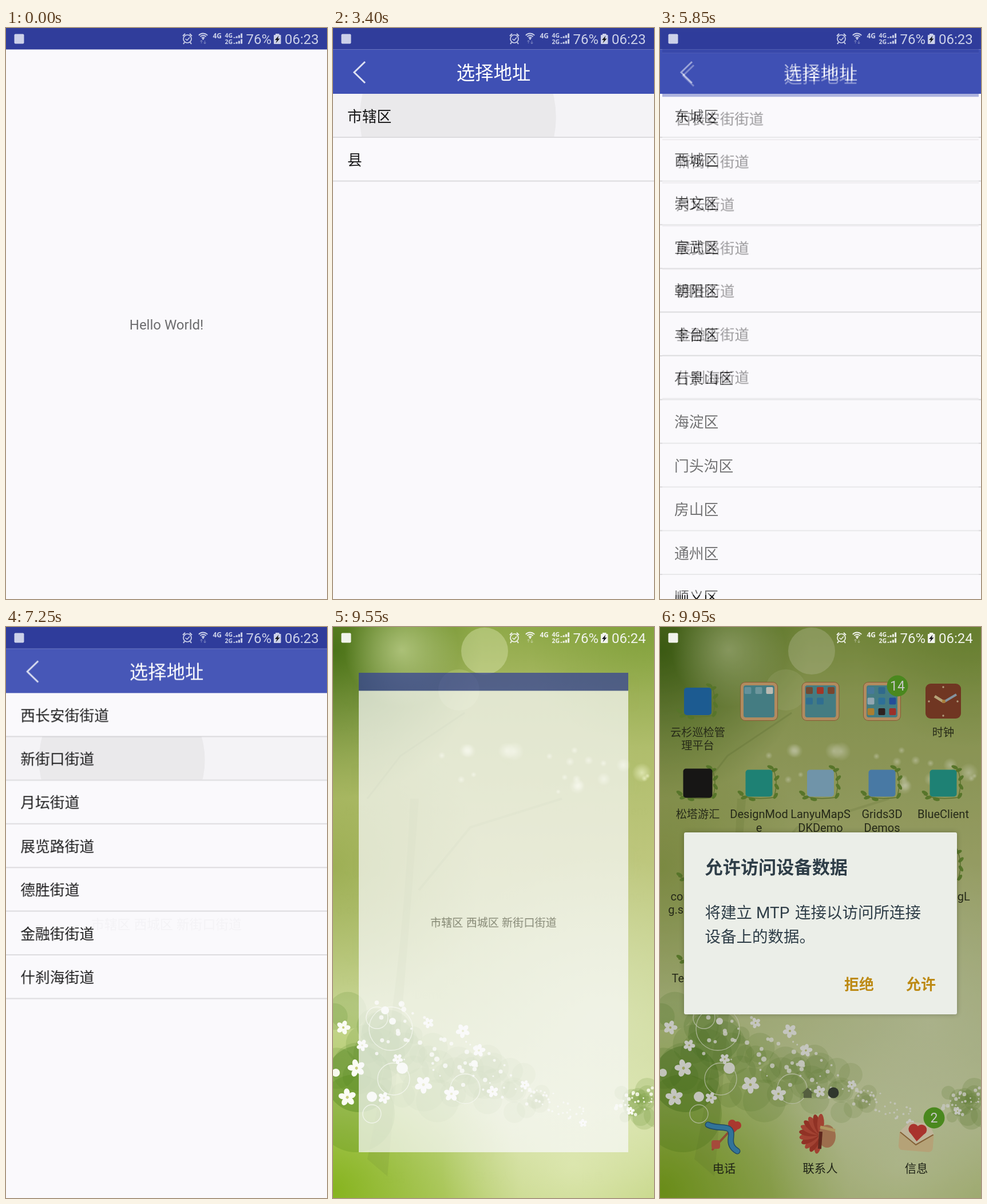
Animation of 561x998 px, one loop 10 s. Source, as an HTML page with a canvas:

```html
<!DOCTYPE html>
<html lang="zh">
<head>
<meta charset="utf-8">
<title>Address picker</title>
<style>
html, body { margin: 0; width: 100%; height: 100%; overflow: hidden; background: #faf9fc; }
canvas { display: block; width: 561px; height: 998px; }
</style>
</head>
<body>
<canvas id="stage"></canvas>
<script>
const W = 561, H = 998, LOOP = 10000, TAU = Math.PI * 2;
const DPR = window.devicePixelRatio || 1;
const LATIN = 'Roboto, "Noto Sans CJK SC", sans-serif';
const CJK = '"Noto Sans CJK SC", "Noto Sans CJK", sans-serif';
const PAPER = '#faf9fc', ROW_TOP = 115, ROW_H = 76.4;

const clamp = v => Math.max(0, Math.min(1, v));
const span = (t, from, length) => clamp((t - from) / length);
const smooth = p => p * p * (3 - 2 * p);

function setup(canvas) {
  canvas.width = W * DPR;
  canvas.height = H * DPR;
  const g = canvas.getContext('2d');
  g.scale(DPR, DPR);
  return g;
}

function layer(draw) {
  const canvas = document.createElement('canvas');
  draw(setup(canvas));
  return canvas;
}

function box(g, x, y, w, h, color, r = 0) {
  g.fillStyle = color;
  g.beginPath();
  g.roundRect(x, y, w, h, r);
  g.fill();
}

function disc(g, x, y, r, color) {
  g.fillStyle = color;
  g.beginPath();
  g.arc(x, y, r, 0, TAU);
  g.fill();
}

function line(g, points, color, width) {
  g.strokeStyle = color;
  g.lineWidth = width;
  g.beginPath();
  points.forEach(([x, y]) => g.lineTo(x, y));
  g.stroke();
}

function text(g, str, x, y, size, color, { align = 'left', family = CJK, weight = 400 } = {}) {
  g.font = `${weight} ${size}px ${family}`;
  g.textAlign = align;
  g.fillStyle = color;
  g.fillText(str, x, y);
}

function random(seed) {
  return () => (seed = (seed * 16807) % 2147483647) / 2147483647;
}

// ---- app pages ----
function blank(g) {
  box(g, 0, 0, W, H, PAPER);
  box(g, 0, 0, W, 37.5, '#303d9b');
}

const hello = layer(g => {
  blank(g);
  text(g, 'Hello World!', 280.5, 527, 24, '#6c6c6e', { align: 'center', family: LATIN });
});

const result = layer(g => {
  blank(g);
  ['市辖区', '西城区', '新街口街道'].forEach((s, i) => text(g, s, 149 + i * 74.4, 527.5, 22.8, '#6c6c6e'));
});

function listPage(items) {
  return layer(g => {
    blank(g);
    box(g, 0, 37.5, W, 77.5, '#3f50b4');
    line(g, [[56, 59], [37, 77.5], [56, 96]], '#dde0f2', 3);
    text(g, '选择地址', 280.5, 90, 32.4, '#fff', { align: 'center' });
    items.split(' ').forEach((s, i) => {
      text(g, s, 25, 163.5 + i * ROW_H, 25.8, '#151516');
      box(g, 0, ROW_TOP + (i + 1) * ROW_H - 1.4, W, 2, '#dcdbde');
    });
  });
}

const cities = listPage('市辖区 县');
const districts = listPage('东城区 西城区 崇文区 宣武区 朝阳区 丰台区 石景山区 海淀区 门头沟区 房山区 通州区 顺义区');
const streets = listPage('西长安街街道 新街口街道 月坛街道 展览路街道 德胜街道 金融街街道 什刹海街道');

// ---- launcher ----
function flower(g, x, y, r, turn) {
  for (let i = 0; i < 5; i++) {
    const a = turn + i * TAU / 5;
    g.fillStyle = '#fbfcf4';
    g.beginPath();
    g.ellipse(x + Math.cos(a) * r * .58, y + Math.sin(a) * r * .58, r * .46, r * .34, a, 0, TAU);
    g.fill();
  }
  disc(g, x, y, r * .16, '#c9cf7a');
}

function glow(g, x, y, r, color) {
  const fade = g.createRadialGradient(x, y, 0, x, y, r);
  fade.addColorStop(0, `rgba(${color})`);
  fade.addColorStop(1, `rgba(${color.replace(/[^,]+$/, '0')})`);
  g.fillStyle = fade;
  g.fillRect(x - r, y - r, 2 * r, 2 * r);
}

const wallpaper = layer(g => {
  const rnd = random(77);
  const base = g.createLinearGradient(0, 0, 0, H);
  [[0, '#8fa948'], [.12, '#a9b964'], [.4, '#bdc67c'], [.65, '#c8d593'], [.85, '#d5e0a8'], [1, '#c3d482']]
    .forEach(([at, c]) => base.addColorStop(at, c));
  g.fillStyle = base;
  g.fillRect(0, 0, W, H);
  glow(g, 0, 40, 260, '62,104,14,.85');
  glow(g, 0, 420, 260, '130,155,50,.55');
  glow(g, 0, 985, 330, '128,176,20,.9');
  glow(g, 540, 10, 200, '120,155,50,.55');
  glow(g, 470, 690, 290, '226,233,192,.6');
  glow(g, 420, 940, 230, '226,235,185,.7');
  glow(g, 120, 40, 100, '212,226,165,.6');
  disc(g, 265, 42, 41, 'rgba(225,235,185,.38)');
  disc(g, 220, 110, 36, 'rgba(220,230,170,.2)');

  // faint plant stem and twigs
  g.fillStyle = 'rgba(105,130,50,.16)';
  g.beginPath();
  g.moveTo(150, 300);
  g.quadraticCurveTo(125, 640, 95, 960);
  g.lineTo(60, 930);
  g.quadraticCurveTo(120, 640, 135, 300);
  g.fill();
  line(g, [[60, 300], [118, 225], [230, 150]], 'rgba(100,125,50,.22)', 3);
  line(g, [[150, 460], [240, 350], [400, 300]], 'rgba(100,125,50,.16)', 4);
  for (let i = 0; i < 22; i++) {
    glow(g, 190 + rnd() * 360, 215 + rnd() * 75, 4 + rnd() * 13, '248,252,215,.6');
  }

  // bush
  for (let i = 0; i < 46; i++) {
    const u = rnd();
    disc(g, u * 370, 730 + u * 95 + (rnd() - .5) * 140 * (1 - u * .5), 14 + rnd() * 34 * (1.2 - u),
      `rgba(${78 + u * 50 | 0},${128 + u * 30 | 0},${32 + u * 40 | 0},.17)`);
  }
  disc(g, 40, 850, 68, 'rgba(90,140,25,.28)');
  disc(g, 45, 790, 58, 'rgba(60,115,15,.3)');
  disc(g, 95, 715, 46, 'rgba(90,135,45,.25)');
  for (let i = 0; i < 14; i++) disc(g, 495 + rnd() * 80, 808 + rnd() * 52, 8 + rnd() * 14, 'rgba(120,155,65,.22)');

  [[101, 702, 38], [77, 683, 19], [106, 790, 28], [68, 851, 16], [231, 807, 26]].forEach(([x, y, r]) => {
    g.strokeStyle = 'rgba(245,250,225,.75)';
    g.lineWidth = 1.3;
    g.beginPath();
    g.arc(x, y, r, 0, TAU);
    g.stroke();
  });
  for (let i = 0; i < 95; i++) {
    const u = rnd();
    disc(g, 70 + u * 370, 690 + u * 165 + (rnd() - .5) * 120 * (1 - u * .75), 1.3 + rnd() * 3.8 * (1.2 - u),
      'rgba(250,252,240,.85)');
  }
  for (let i = 0; i < 26; i++) disc(g, 490 + rnd() * 71, 805 + rnd() * 48, 1 + rnd() * 2.5, 'rgba(250,252,240,.85)');
  [[91, 670, 7], [121, 771, 10], [68, 821, 9], [104, 689, 6], [5, 779, 7], [247, 763, 6]]
    .forEach(([x, y, r]) => disc(g, x, y, r, '#f8faee'));
  [[18, 700, 12], [41, 771, 15], [51, 731, 10], [25, 822, 15], [158, 800, 15], [207, 816, 13], [227, 706, 12],
    [255, 740, 11], [167, 692, 9], [89, 823, 10], [279, 812, 10], [335, 800, 8], [437, 867, 7], [113, 755, 9], [520, 846, 7]]
    .forEach(([x, y, r], i) => flower(g, x, y, r, i * .7));
});

function leaf(g, x, y, turn) {
  g.fillStyle = '#6f9636';
  g.beginPath();
  g.ellipse(x, y, 6, 3, turn, 0, TAU);
  g.fill();
}

function vine(g, x, y) {
  g.strokeStyle = '#78903c';
  g.lineWidth = 1.5;
  g.beginPath();
  g.moveTo(x - 34, y + 20);
  g.quadraticCurveTo(x - 12, y + 30, x + 26, y + 25);
  g.quadraticCurveTo(x + 34, y, x + 26, y - 22);
  g.stroke();
  [[-32, 17, .5], [-26, 25, -.3], [-12, 28, .2], [29, 22, -1], [31, 6, 1], [31, -9, -.8], [27, -23, -.4], [20, -28, .4]]
    .forEach(([dx, dy, a]) => leaf(g, x + dx, y + dy, a));
}

function tile(g, x, y, color, size = 48) {
  vine(g, x, y);
  box(g, x - size / 2, y - size / 2, size, size, color, 5);
}

function folder(g, x, cells) {
  box(g, x - 33, 96, 66, 68, '#a87440', 9);
  box(g, x - 32, 97, 64, 66, '#e2b27a', 8);
  box(g, x - 27, 102, 54, 56, '#579fa6', 4);
  cells.forEach((c, i) => {
    if (c) box(g, x - 25.5 + i % 3 * 19, 105 + Math.floor(i / 3) * 18.5, 12, 12, c, 2);
  });
}

function badge(g, x, y, count) {
  disc(g, x, y, 18.5, '#5fae27');
  text(g, count, x, y + 8, 23, '#fff', { align: 'center', family: LATIN });
}

function label(g, x, y, lines) {
  lines.split('|').forEach((s, i) => {
    const latin = /[a-z]/i.test(s);
    text(g, s, x, y + i * 23.5, latin ? 20 : 19.2, '#30351f', { align: 'center', family: latin ? LATIN : CJK });
  });
}

function bow(g) {
  g.lineCap = 'round';
  line(g, [[92, 913], [130, 872]], '#b9653f', 4);
  box(g, 90, 897, 15, 15, '#d55f4c', 4);
  disc(g, 126, 868, 7, '#d9483c');
  disc(g, 135, 871, 7, '#d9483c');
  g.beginPath();
  g.moveTo(119, 870);
  g.lineTo(141, 873);
  g.lineTo(127, 886);
  g.fill();
  for (const [color, width] of [['#2c5f80', 11], ['#3f93c4', 8]]) {
    g.strokeStyle = color;
    g.lineWidth = width;
    g.beginPath();
    g.moveTo(84, 870);
    g.bezierCurveTo(104, 880, 128, 866, 124, 892);
    g.bezierCurveTo(122, 906, 128, 912, 135, 916);
    g.stroke();
  }
  g.lineCap = 'butt';
}

function headdress(g) {
  for (let i = 0; i < 11; i++) {
    const a = 1.75 + i * .3;
    g.fillStyle = i % 2 ? '#b8402f' : '#cf5540';
    g.beginPath();
    g.ellipse(280 + Math.cos(a) * 20, 886 + Math.sin(a) * 18, 17, 6, a, 0, TAU);
    g.fill();
  }
  g.fillStyle = '#c98d62';
  g.beginPath();
  g.ellipse(292, 890, 15, 20, 0, 0, TAU);
  g.fill();
  line(g, [[280, 874], [306, 880]], '#e0c07a', 5);
  line(g, [[281, 882], [279, 912]], '#7a3327', 6);
}

function envelope(g) {
  g.save();
  g.translate(448, 894);
  g.rotate(.08);
  box(g, -30, -14, 60, 36, '#e8cf98', 7);
  g.fillStyle = '#f3e6c4';
  g.beginPath();
  g.moveTo(-30, -10);
  g.lineTo(-14, -28);
  g.lineTo(20, -28);
  g.lineTo(30, -10);
  g.lineTo(0, 10);
  g.fill();
  line(g, [[-29, -9], [0, 11], [29, -9]], '#a97c45', 2);
  disc(g, -6, -16, 9, '#d8413a');
  disc(g, 8, -16, 9, '#d8413a');
  g.beginPath();
  g.moveTo(-14, -12);
  g.lineTo(16, -12);
  g.lineTo(1, 5);
  g.fill();
  g.restore();
}

const home = layer(g => {
  const col = [66, 173, 280.5, 388, 495], row = [130, 273, 416, 560];
  const TEAL = '#27a595', ROBOT = '#86a83e', BLUE = '#2475ba';
  tile(g, col[0], row[0], BLUE);
  folder(g, col[1], ['#7fb9c6', '#8cc0c8', '#f0efe4']);
  folder(g, col[2], ['#8f6042', '#cf4632', '#9a5a3c', '#3e8db8', '#3e8db8']);
  folder(g, col[3], ['#5b9bc4', '#3d86b5', '', '#b9d4e2', '#3b8fc2', '#2f64c4', '#d9a13b', '#3a2a28', '#c63f36']);
  badge(g, 415, 103, '14');
  box(g, 464, 99, 62, 61, '#8f452c', 9);
  [[0, -25], [25, 0], [0, 25], [-25, 0]].forEach(([x, y]) => disc(g, 495 + x, 130 + y, 1.7, '#e3c9a2'));
  line(g, [[496, 131], [480, 121]], '#e9cf98', 5);
  line(g, [[496, 131], [518, 118]], '#a9bccb', 4);
  disc(g, 496, 130, 3, '#d9a048');

  [['#1d1c1b', TEAL, '#8fbdd8', '#5c9bd2', TEAL], ['#254a7c', TEAL, ROBOT, ROBOT, TEAL], [TEAL, ROBOT]]
    .forEach((colors, r) => colors.forEach((c, i) => tile(g, col[i], row[r + 1], c, c === '#1d1c1b' ? 51 : 47)));

  [['云杉巡检管|理平台', '', '', '', '时钟'],
    ['松塔游汇', 'DesignMod|e', 'LanyuMapS|DKDemo', 'Grids3D|Demos', 'BlueClient'],
    ['com.umen|g.soexampl', 'ghshome', 'SoftConfig', 'OrderListLo|gic', 'WancangL|oad'],
    ['TestDemo', 'ChoseAddr|Demo']]
    .forEach((names, r) => names.forEach((s, i) => label(g, col[i], 190.5 + r * 143.5, s)));

  g.fillStyle = '#6d7a50';
  g.beginPath();
  [[248, 815], [258, 805], [268, 815], [265, 815], [265, 823], [251, 823], [251, 815]].forEach(([x, y]) => g.lineTo(x, y));
  g.fill();
  disc(g, 303, 814, 9.5, '#3d463a');

  bow(g);
  headdress(g);
  envelope(g);
  badge(g, 479, 858, '2');
  ['电话', '联系人', '信息'].forEach((s, i) => text(g, s, 112 + i * 168, 954, 20.3, '#272b1c', { align: 'center' }));
});

const dialog = layer(g => {
  g.shadowColor = 'rgba(0,0,0,.25)';
  g.shadowBlur = 8;
  box(g, 42, 359, 477, 318, '#ebeee8', 3);
  g.shadowBlur = 0;
  const ink = '#2f3e48';
  text(g, '允许访问设备数据', 78.5, 431, 31.2, ink, { weight: 700 });
  text(g, '将建立', 78.5, 509, 27.5, ink);
  text(g, 'MTP', 168, 509, 28, ink, { family: LATIN });
  text(g, '连接以访问所连接', 236, 509, 27.5, ink);
  text(g, '设备上的数据。', 78.5, 550.5, 27.5, ink);
  text(g, '拒绝', 322, 634, 26, '#bd8a14', { weight: 700 });
  text(g, '允许', 430, 634, 26, '#bd8a14', { weight: 700 });
});

// ---- status bar ----
function statusBar(g, t) {
  const ink = t < 9500 ? '#ccd1e9' : '#f1f3ec';
  const bold = { family: '"Open Sans", sans-serif', weight: 700 };
  box(g, 14.5, 10.5, 17, 17, ink, 2);

  g.strokeStyle = ink;
  g.lineWidth = 1.7;
  g.beginPath();
  g.arc(317, 19, 7, 0, TAU);
  g.stroke();
  line(g, [[313.5, 19], [316.5, 21.5], [321, 16.5]], ink, 1.5);
  line(g, [[309, 14], [313, 10]], ink, 2);
  line(g, [[321, 10], [325, 14]], ink, 2);
  line(g, [[312, 25], [310, 28]], ink, 2);
  line(g, [[322, 25], [324, 28]], ink, 2);

  g.lineWidth = 1.9;
  [3.5, 7, 10.5].forEach(r => {
    g.beginPath();
    g.arc(344.5, 20, r, -Math.PI * .76, -Math.PI * .24);
    g.stroke();
  });
  disc(g, 344.5, 19, 1.6, ink);
  g.globalAlpha = t >= 750 && t < 1750 ? 1 : .35;
  [[341.5, 1], [347.5, -1]].forEach(([x, dir]) => {
    line(g, [[x, 22], [x, 27]], ink, 1.4);
    line(g, [[x - 2, 24.5 - dir], [x, 24.5 - dir * 3], [x + 2, 24.5 - dir]], ink, 1.2);
  });
  g.globalAlpha = 1;

  text(g, '4G', 361.5, 18, 12, ink, bold);
  ['4G', '2G'].forEach((s, i) => {
    const base = 17.5 + i * 10;
    text(g, s, 382.5, base - (i ? 0 : .5), 10.5, ink, bold);
    [1.5, 3, 5, 8].forEach((h, k) => box(g, 397.5 + k * 4.2, base - h, 3, h, ink));
  });
  text(g, '76%', 419.5, 28, 24, ink, { family: LATIN });

  box(g, 471, 10, 6.5, 3, ink);
  box(g, 468, 12, 12.5, 16, ink, 1);
  g.fillStyle = '#15171c';
  g.beginPath();
  [[476.5, 13.5], [470, 21], [473.5, 21], [471.5, 26.5], [478.5, 18.5], [475, 18.5]].forEach(([x, y]) => g.lineTo(x, y));
  g.fill();
  text(g, t < 8150 ? '06:23' : '06:24', 487, 28, 24, ink, { family: LATIN });
}

// ---- playback ----
const g = setup(document.getElementById('stage'));

function show(image, alpha = 1, scale = 1, cy = H / 2) {
  if (alpha <= 0) return;
  g.save();
  g.globalAlpha = alpha;
  g.translate(W / 2, cy);
  g.scale(scale, scale);
  g.drawImage(image, -W / 2, -cy, W, H);
  g.restore();
}

const windowScale = p => .977 + .023 * p;

function open(image, t, start) {
  const p = smooth(span(t, start, 400));
  show(image, p, windowScale(p));
}

function ripple(t, start, row, touchX) {
  const age = t - start;
  if (age < 0 || age > 520) return;
  const grow = clamp(age / 500), fade = 1 - span(age, 380, 140);
  const top = ROW_TOP + row * ROW_H;
  g.save();
  g.beginPath();
  g.rect(0, top, W, ROW_H - 1.4);
  g.clip();
  g.fillStyle = `rgba(0,0,0,${.022 * clamp(age / 150) * fade})`;
  g.fillRect(0, top, W, ROW_H);
  disc(g, touchX + (W / 2 - touchX) * grow, top + 41, 12 + 265 * grow, `rgba(0,0,0,${.042 * fade})`);
  g.restore();
}

function goHome(t) {
  const leave = span(t, 9425, 425), enter = span(t, 9550, 350), pop = span(t, 9580, 340);
  show(wallpaper);
  show(home, enter, 1 + .035 * (1 - enter));
  show(result, 1 - leave, 1 - .54 * leave);
  g.fillStyle = `rgba(0,0,0,${.22 * pop})`;
  g.fillRect(0, 0, W, H);
  show(dialog, pop, 1 + .027 * (1 - pop), 518);
}

function frame(t) {
  if (t < 3100) {
    show(hello);
    open(cities, t, 1150);
  } else if (t < 5300) {
    show(cities);
    ripple(t, 3100, 0, 124);
    open(districts, t, 3475);
  } else if (t < 7000) {
    show(districts);
    ripple(t, 5300, 1, 124);
    open(streets, t, 5675);
  } else if (t < 9450) {
    const p = 1 - smooth(span(t, 7200, 400));
    show(result);
    show(streets, p, windowScale(p));
    if (t < 7400) ripple(t, 7000, 1, 124);
  } else {
    goHome(t);
  }
  statusBar(g, t);
}

const began = performance.now();
function tick() {
  frame((performance.now() - began) % LOOP);
  requestAnimationFrame(tick);
}
tick();
</script>
</body>
</html>
```
